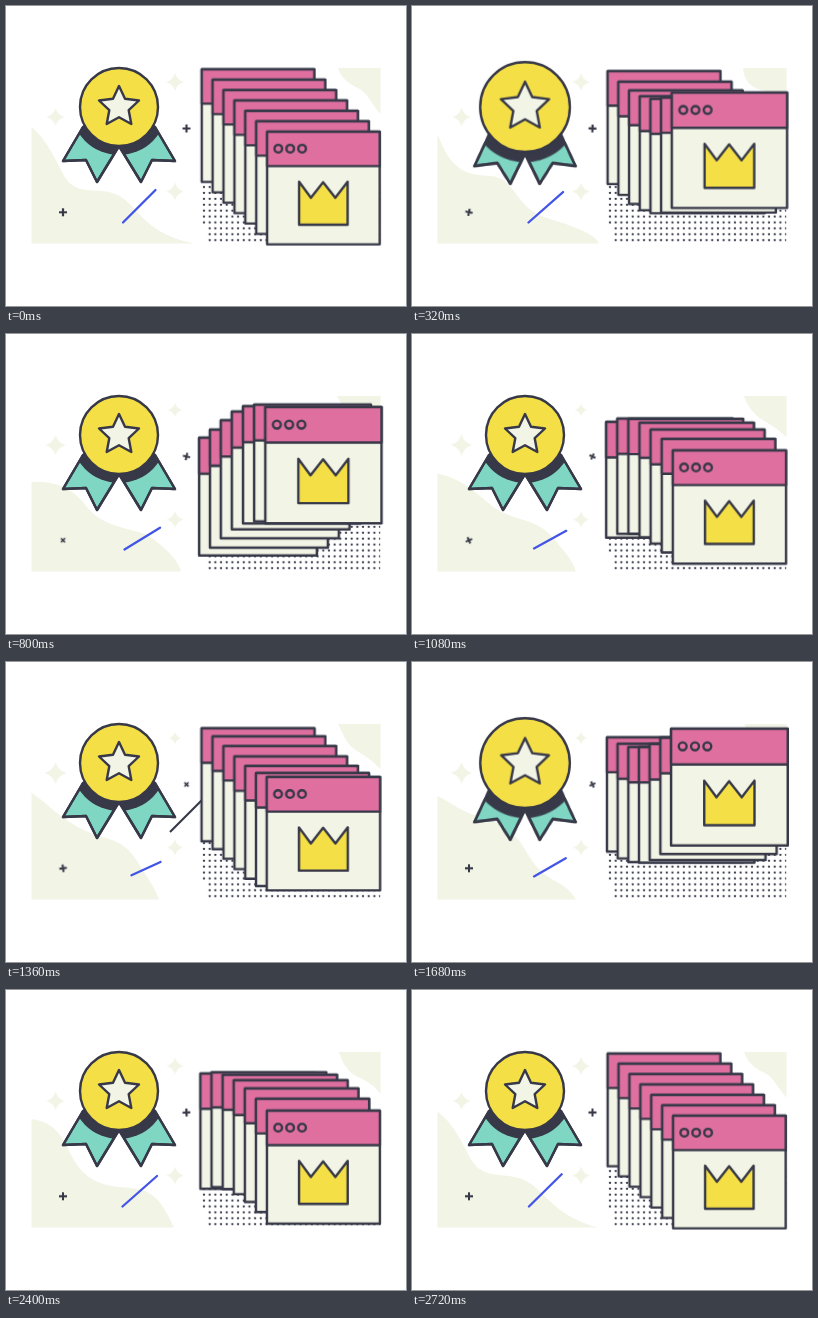
An HTML page that plays this animation: 400x300 px, repeating every 2760 ms.

```html
<!DOCTYPE html>
<html lang="en">
<head>
<meta charset="utf-8">
<title>Award and windows</title>
<style>
  :root {
    --ink: #373948; --cream: #f2f4e6; --pink: #df6f9f;
    --yellow: #f5df46; --teal: #7fd6c2; --blue: #4355e6;
    --loop: 2760ms;
    --sine: cubic-bezier(.37, 0, .63, 1);
    --smooth: cubic-bezier(.333, 0, .667, 1);
  }
  html, body { margin: 0; width: 100%; height: 100%; overflow: hidden; background: #fff; }
  svg { display: block; width: 100vw; height: 100vh; }

  .line { stroke: var(--ink); stroke-width: 2.4; stroke-linejoin: round; stroke-linecap: round; }
  .line * { vector-effect: non-scaling-stroke; }
  .cream { fill: var(--cream); }
  .pink { fill: var(--pink); }
  .yellow { fill: var(--yellow); }
  .teal { fill: var(--teal); }
  .ink { fill: var(--ink); }

  /* Stacked windows: --i is the depth, 0 at the back */
  .win {
    --x: calc(195.7px + var(--i) * 10.9px);
    --y: calc(63.3px + var(--i) * 10.4px);
    --up: calc(var(--y) + 45px - var(--i) * 20px);
    transform-origin: 56.3px 56.3px;
    animation: fan var(--loop) calc((6 - var(--i)) * 40ms) infinite both;
  }
  @keyframes fan {
    0% { transform: translate(var(--x), var(--y)) scale(1); animation-timing-function: cubic-bezier(.333, 0, .667, 1); }
    23.19% { transform: translate(var(--x), var(--up)) scale(1.048); animation-timing-function: cubic-bezier(.12, 0, .6, 1); }
    44.93% { transform: translate(var(--x), var(--y)) scale(1); animation-timing-function: cubic-bezier(.2, 0, .75, 1); }
    68.12% { transform: translate(var(--x), var(--up)) scale(1.048); animation-timing-function: cubic-bezier(.2, 0, .6, 1); }
    91.3%, 100% { transform: translate(var(--x), var(--y)) scale(1); }
  }

  /* Medal pulses twice per loop */
  .disc, .star, .tail { animation: disc 1380ms var(--smooth) infinite; }
  .star { animation-name: star; }
  .tail { animation-name: tail; }
  @keyframes disc {
    0%, 56.5%, 100% { transform: scale(1); }
    23.2%, 29% { transform: scale(1.15); }
  }
  @keyframes star {
    0%, 57.2%, 100% { transform: scale(1); }
    26%, 37.7% { transform: scale(1.21); }
  }
  @keyframes tail {
    0%, 57.2%, 100% { transform: rotate(0deg); }
    23.2%, 43.5% { transform: rotate(-5.5deg); }
  }

  .spark { animation: spark var(--loop) var(--sine) infinite; }
  @keyframes spark { 50% { transform: scale(var(--s)); } }

  .plus { stroke: var(--ink); stroke-width: 2.2; animation: turn-a var(--loop) infinite; }
  .plus.b { animation-name: turn-b; }
  @keyframes turn-a {
    0% { transform: rotate(0deg) scale(1); animation-timing-function: cubic-bezier(.55, 0, .85, .65); }
    50% { transform: rotate(45deg) scale(.7); animation-timing-function: cubic-bezier(.15, .35, .45, 1); }
    100% { transform: rotate(90deg) scale(1); }
  }
  @keyframes turn-b {
    0% { transform: rotate(0deg) scale(1); animation-timing-function: cubic-bezier(.33, .1, .85, .7); }
    29% { transform: rotate(45deg) scale(.72); animation-timing-function: cubic-bezier(.15, .3, .67, .9); }
    58%, 100% { transform: rotate(90deg) scale(1); }
  }

  .hill { animation: hill var(--loop) linear infinite; }
  @keyframes hill {
    0%, 100% { d: path("M25.5 237.5 L25.5 121 C38 131 47 148 56 166 S75 184 95 185 S122 196 135 210 S165 233 188 237.5 Z"); }
    11.6% { d: path("M25.5 237.5 L25.5 128 C31 142 37 157 52 165 S84 165 96 178 S112 205 135 212 S184 228 187 237.5 Z"); }
    29% { d: path("M25.5 237.5 L25.5 148 C45 147 62 152 74 165 S88 184 108 191 S138 197 150 207 S172 226 175 237.5 Z"); }
    49.3% { d: path("M25.5 237.5 L25.5 131 C37 138 48 150 62 159 S85 172 100 176 S124 187 133 202 S148 224 153 237.5 Z"); }
    72.5% { d: path("M25.5 237.5 L25.5 137 C38 142 48 147 65 148 S95 152 102 168 S110 207 122 214 S160 217 175 237.5 Z"); }
    87% { d: path("M25.5 237.5 L25.5 129 C42 131 52 139 60 155 S74 184 92 192 S130 195 143 203 S160 222 168 237.5 Z"); }
  }
  .corner { animation: corner var(--loop) linear infinite; }
  @keyframes corner {
    0%, 100% { d: path("M374.5 62 L332 62 C335 72 343 78 352 82 S366 99 374.5 108 Z"); }
    11.6% { d: path("M374.5 62 L331 62 C332 73 337 81 349 84 S366 90 374.5 97 Z"); }
    29% { d: path("M374.5 62 L331 62 C334 68 338 75 349 82 S366 92 374.5 100 Z"); }
    49.3% { d: path("M374.5 62 L332 62 C337 72 341 83 351 89 S366 98 374.5 107 Z"); }
    87% { d: path("M374.5 62 L333 62 C336 73 342 82 352 87 S367 94 374.5 104 Z"); }
  }

  .dash { stroke: var(--blue); stroke-width: 2.3; stroke-linecap: round; animation: dash var(--loop) linear infinite; }
  @keyframes dash {
    0%, 100% { d: path("M117 216.5 L149.5 184"); }
    11.6% { d: path("M116.5 216.5 L151 186"); }
    29% { d: path("M118.5 215.5 L154 193.7"); }
    49.3% { d: path("M125.5 213.3 L154.5 200"); }
    72.5% { d: path("M118.5 215.5 L153 192.3"); }
    87% { d: path("M116.5 216.5 L151 186"); }
  }

  .trail { stroke: var(--ink); stroke-width: 2.2; stroke-dasharray: 1 2; animation: trail var(--loop) infinite; }
  @keyframes trail {
    0%, 39.1% { stroke-dashoffset: 1; visibility: hidden; }
    39.2% { stroke-dashoffset: 1; visibility: visible; }
    48.5%, 49.5% { stroke-dashoffset: 0; visibility: visible; }
    59.4% { stroke-dashoffset: -1; visibility: visible; }
    59.5%, 100% { stroke-dashoffset: -1; visibility: hidden; }
  }
</style>
</head>
<body>
<svg viewBox="0 0 400 300" fill="none">
  <defs>
    <pattern id="dots" x="195.2" y="178.2" width="5.68" height="5.9" patternUnits="userSpaceOnUse">
      <circle class="ink" cx="2.8" cy="2.8" r="1.15"/>
    </pattern>
    <path id="spark" d="M0-9Q2-2 9 0Q2 2 0 9Q-2 2-9 0Q-2-2 0-9Z"/>
    <path id="plus" d="M-4 0H4M0-4V4"/>
    <path id="ribbon" d="M0 0L-36 20L-56 54L-33 53L-22 75L0 39Z"/>
    <clipPath id="cut"><use href="#ribbon"/></clipPath>
    <g id="win">
      <rect class="cream" width="112.6" height="112.6"/>
      <rect class="pink" width="112.6" height="34.4"/>
    </g>
  </defs>

  <path class="hill cream" d="M25.5 237.5L25.5 121L188 237.5Z"/>
  <path class="corner cream" d="M374.5 62L332 62L374.5 108Z"/>
  <path fill="url(#dots)" d="M195.2 178.2H374.2V237.2H200.9V219.5H195.2Z"/>

  <g class="cream">
    <g transform="translate(169 76)"><g class="spark" style="--s:.67"><use href="#spark"/></g></g>
    <g transform="translate(49.5 111)"><g class="spark" style="--s:1.22"><use href="#spark"/></g></g>
    <g transform="translate(169 185.5)"><g class="spark" style="--s:.89"><use href="#spark"/></g></g>
  </g>
  <g transform="translate(180.5 122.5)"><g class="plus"><use href="#plus"/></g></g>
  <g transform="translate(57 206.3)"><g class="plus b"><use href="#plus"/></g></g>

  <path class="dash" d="M117 216.5L149.5 184"/>
  <path class="trail" pathLength="1" d="M164 170L205 129"/>

  <g class="line" transform="translate(113 101)">
    <g class="tail">
      <use href="#ribbon" class="teal"/>
      <g clip-path="url(#cut)"><circle class="disc ink" r="48" stroke="none"/></g>
      <use href="#ribbon"/>
    </g>
    <g transform="scale(-1 1)">
      <g class="tail">
        <use href="#ribbon" class="teal"/>
        <g clip-path="url(#cut)"><circle class="disc ink" r="48" stroke="none"/></g>
        <use href="#ribbon"/>
      </g>
    </g>
    <circle class="disc yellow" r="39"/>
    <path class="star cream" d="M0-21L6-8.3L20-6.5L9.7 3.2L12.3 17L0 10.2L-12.3 17L-9.7 3.2L-20-6.5L-6-8.3Z"/>
  </g>

  <g class="line">
    <g class="win" style="--i:0"><use href="#win"/></g>
    <g class="win" style="--i:1"><use href="#win"/></g>
    <g class="win" style="--i:2"><use href="#win"/></g>
    <g class="win" style="--i:3"><use href="#win"/></g>
    <g class="win" style="--i:4"><use href="#win"/></g>
    <g class="win" style="--i:5"><use href="#win"/></g>
    <g class="win" style="--i:6">
      <use href="#win"/>
      <circle cx="11.2" cy="16.9" r="3.8"/>
      <circle cx="23.1" cy="16.9" r="3.8"/>
      <circle cx="35" cy="16.9" r="3.8"/>
      <path class="yellow" d="M32 50L43.8 66L56 50.5L68.2 66L80.5 50V93H32Z"/>
    </g>
  </g>
</svg>
</body>
</html>
```
